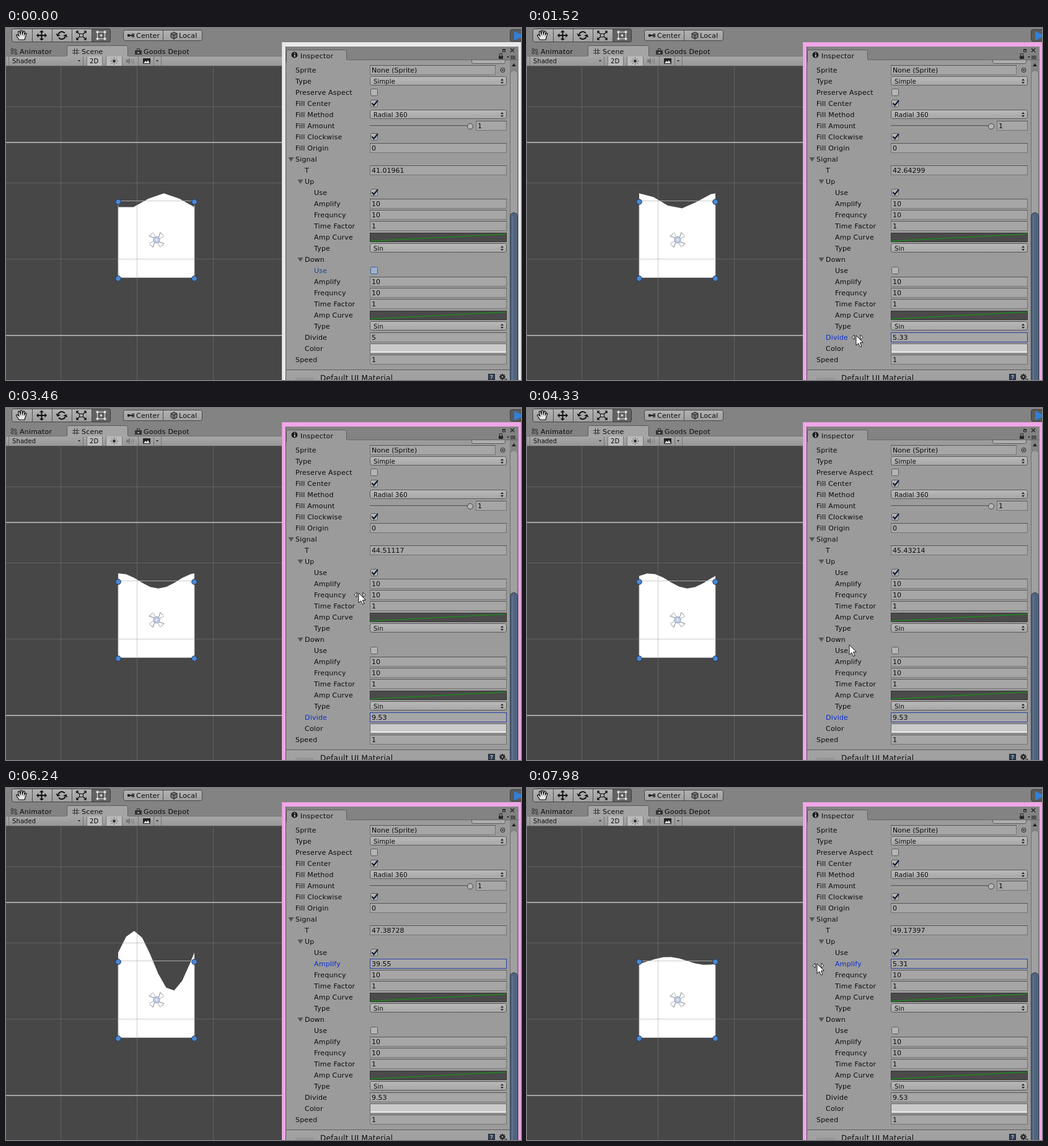
An HTML page with a canvas that plays this animation: 831x569 px, repeating every 8000 ms.

```html
<!DOCTYPE html>
<html lang="en">
<head>
<meta charset="utf-8">
<title>Signal inspector</title>
<style>
html, body { margin: 0; width: 100%; height: 100%; overflow: hidden; background: #838383; }
canvas { display: block; width: 831px; height: 569px; }
</style>
</head>
<body>
<canvas id="stage" width="831" height="569"></canvas>
<script>
const ctx = document.getElementById('stage').getContext('2d');
const LOOP = 8000, TAU = Math.PI * 2;
const FONT = '"DejaVu Sans", Verdana, sans-serif';
const PANEL = '#9b9b9b', BAR = '#838383', INK = '#0c0c0c', BLUE = '#0a2fd0';

// Tracks: [time, value, ...]
const marks = [0, 1520, 2190, 3460, 5220, 6240, 7980];
const clockTrack = [[0, 41.01961], [1520, 42.64299], [2190, 43.34213], [3460, 44.51117],
  [5220, 46.40158], [6240, 47.38728], [7980, 49.17397]];
const phaseTrack = [[0, 0.65], [1520, 2.228], [2190, 2.925], [3460, 4.224],
  [5220, 6.0465], [6240, 7.045], [7980, 8.868]];
const divideTrack = [[1330, 5], [1520, 5.33], [2190, 8.6], [2490, 9.53]];
const ampTrack = [[5300, 10], [5880, 28], [6240, 39.55], [6420, 47], [6690, 28], [7490, 16], [7980, 5.31]];
const pointerTrack = [[560, 560, 532], [830, 530, 506], [1300, 521, 497], [1520, 531, 497],
  [2190, 638, 494], [2480, 668, 492], [3120, 667, 485], [3360, 605, 394], [3460, 569, 299],
  [3700, 545, 214], [4150, 522, 380], [4500, 518, 386], [5000, 515, 310], [5220, 516, 280],
  [5300, 519, 280], [5840, 795, 283], [5890, 811, 284], [5960, 850, 286], [6630, 850, 293],
  [6690, 811, 294], [7490, 622, 293], [7980, 468, 284]];
const PRESS_DIVIDE = 1290, PRESS_AMP = 5180;

function at(track, t, col = 1) {
  if (t <= track[0][0]) return track[0][col];
  for (let i = 1; i < track.length; i++) {
    const a = track[i - 1], b = track[i];
    if (t <= b[0]) return a[col] + (b[col] - a[col]) * (t - a[0]) / (b[0] - a[0]);
  }
  return track[track.length - 1][col];
}

function snap(t) {
  for (let i = 1; i < marks.length; i++) {
    if (t < marks[i]) {
      const a = marks[i - 1], step = (marks[i] - a) / Math.round((marks[i] - a) / 45);
      return a + Math.floor((t - a) / step) * step;
    }
  }
  return marks[marks.length - 1];
}

function rect(x, y, w, h, fill) {
  ctx.fillStyle = fill;
  ctx.fillRect(x, y, w, h);
}
function frame(x, y, w, h, color) {
  ctx.strokeStyle = color;
  ctx.lineWidth = 1;
  ctx.strokeRect(x + 0.5, y + 0.5, w - 1, h - 1);
}
function round(x, y, w, h, r, fill, stroke) {
  ctx.beginPath();
  ctx.roundRect(x + 0.5, y + 0.5, w - 1, h - 1, r);
  ctx.fillStyle = fill;
  ctx.fill();
  if (stroke) { ctx.strokeStyle = stroke; ctx.lineWidth = 1; ctx.stroke(); }
}
function poly(points, fill, stroke, open) {
  ctx.beginPath();
  for (let i = 0; i < points.length; i += 2) ctx.lineTo(points[i], points[i + 1]);
  if (!open) ctx.closePath();
  if (fill) { ctx.fillStyle = fill; ctx.fill(); }
  if (stroke) { ctx.strokeStyle = stroke; ctx.stroke(); }
}
function line(x1, y1, x2, y2, color, width = 1) {
  ctx.lineWidth = width;
  poly([x1, y1, x2, y2], null, color, true);
}
function disc(x, y, r, fill, stroke) {
  ctx.beginPath();
  ctx.arc(x, y, r, 0, TAU);
  if (fill) { ctx.fillStyle = fill; ctx.fill(); }
  if (stroke) { ctx.strokeStyle = stroke; ctx.lineWidth = 1; ctx.stroke(); }
}
function text(s, x, y, color = INK, size = 11, gap = 0.2) {
  ctx.font = size + 'px ' + FONT;
  ctx.letterSpacing = gap + 'px';
  ctx.fillStyle = color;
  ctx.fillText(s, x, y);
}
function shade(y1, c1, y2, c2) {
  const g = ctx.createLinearGradient(0, y1, 0, y2);
  g.addColorStop(0, c1);
  g.addColorStop(1, c2);
  return g;
}
function arrowHead(x, y, angle, size, color) {
  ctx.save();
  ctx.translate(x, y);
  ctx.rotate(angle);
  poly([size, 0, 0, -size, 0, size], color);
  ctx.restore();
}

function toolbar() {
  rect(0, 0, 831, 62, BAR);
  round(9, 1, 160, 22, 3, shade(1, '#b4b4b4', 23, '#9d9d9d'), '#454545');
  round(138, 1, 31, 22, 3, '#626262', '#3c3c3c');
  for (const x of [42.5, 74.5, 106.5, 138.5]) line(x, 2, x, 22, '#4e4e4e');

  // Hand
  ctx.lineWidth = 1.2;
  poly([21, 19, 16.5, 12, 18, 10.5, 21, 13, 19.5, 6, 21.5, 5, 23.5, 10, 23.5, 4, 25.7, 4, 26.5, 10,
    28, 5, 30, 5.5, 29.5, 11, 31.5, 8, 33, 9, 30, 19], '#e6e6e6', '#111');
  // Move
  line(51, 12, 64, 12, '#111', 2);
  line(57.5, 6, 57.5, 18, '#111', 2);
  for (let i = 0; i < 4; i++) {
    const a = i * TAU / 4;
    arrowHead(57.5 + Math.cos(a) * 5, 12 + Math.sin(a) * 5, a, 3.6, '#111');
  }
  // Rotate
  ctx.strokeStyle = '#111';
  ctx.lineWidth = 2;
  for (const a of [0, Math.PI]) {
    ctx.beginPath();
    ctx.arc(90, 12, 6, a + 0.35, a + 2.5);
    ctx.stroke();
    arrowHead(90 + Math.cos(a + 0.3) * 6, 12 + Math.sin(a + 0.3) * 6, a - 1.2, 4, '#111');
  }
  // Scale
  frame(118, 9, 7, 6, '#111');
  for (let i = 0; i < 4; i++) {
    const a = TAU / 8 + i * TAU / 4, c = Math.cos(a), s = Math.sin(a);
    line(121.5 + c * 5, 12 + s * 4, 121.5 + c * 10, 12 + s * 8, '#111', 1.5);
    arrowHead(121.5 + c * 8.5, 12 + s * 7.5, a, 3.2, '#111');
  }
  // Rect
  frame(147, 6, 13, 12, '#e4e4e4');
  for (const x of [147.5, 159.5]) for (const y of [6.5, 17.5]) disc(x, y, 2, '#e8e8e8');
  disc(153.5, 12, 1.7, '#e8e8e8');

  round(189, 3, 128, 18, 3, shade(3, '#b3b3b3', 21, '#9f9f9f'), '#454545');
  line(253.5, 4, 253.5, 20, '#505050');
  rect(200, 11, 6, 2, '#222');
  rect(196, 10, 4, 4, '#222');
  frame(203, 9, 4, 6, '#222');
  text('Center', 210, 16);
  ctx.lineWidth = 1;
  poly([266, 9, 271, 6.5, 276, 9, 276, 15, 271, 18, 266, 15], '#777', '#222');
  poly([266, 9, 271, 11.5, 276, 9], null, '#222', true);
  line(271, 11.5, 271, 18, '#222');
  text('Local', 279, 16);

  round(813, 2, 30, 20, 3, '#5a5a5a', '#3a3a3a');
  poly([820, 5, 836, 12.5, 820, 20], '#3180d8');
}

function sceneHeader() {
  for (const [x, y] of [[10, 35], [15, 36], [10, 40], [16, 41]]) disc(x, y, 1.8, null, '#2d2d2d');
  text('Animator', 22, 42);
  round(98, 28, 99, 22, 3, '#a4a4a4', '#5c5c5c');
  for (const d of [0, 4]) {
    line(110.5 + d, 33, 110.5 + d, 43, '#333');
    line(107, 36.5 + d, 118, 36.5 + d, '#333');
  }
  text('Scene', 122, 42);
  rect(208, 36, 11, 7, '#333');
  frame(211, 33, 5, 4, '#333');
  rect(212, 39, 3, 2, '#aaa');
  text('Goods Depot', 222, 42);

  rect(0, 45, 445, 17, shade(45, '#a8a8a8', 62, '#969696'));
  line(0, 45.5, 98, 45.5, '#6f6f6f');
  line(197, 45.5, 445, 45.5, '#6f6f6f');
  line(0, 61.5, 445, 61.5, '#5a5a5a');
  rect(130, 46, 25, 15, '#bcbcbc');
  rect(161, 46, 26, 15, '#bcbcbc');
  for (const x of [4, 124, 130, 155, 161, 187, 213, 238, 250]) line(x + 0.5, 46, x + 0.5, 61, '#757575');
  text('Shaded', 10, 57, INK, 10, 0.1);
  poly([116, 52, 120, 52, 118, 54.5], '#222');
  text('2D', 135, 57, INK, 10, 0.1);
  disc(174.5, 53.5, 2.4, '#333');
  for (let i = 0; i < 8; i++) {
    const c = Math.cos(i * TAU / 8), s = Math.sin(i * TAU / 8);
    line(174.5 + c * 4, 53.5 + s * 4, 174.5 + c * 5.8, 53.5 + s * 5.8, '#333');
  }
  poly([194, 51, 197, 51, 200, 48, 200, 59, 197, 56, 194, 56], '#777');
  ctx.lineWidth = 1;
  ctx.strokeStyle = '#777';
  for (const r of [3, 6]) { ctx.beginPath(); ctx.arc(200, 53.5, r, -0.9, 0.9); ctx.stroke(); }
  rect(221, 49, 12, 9, '#222');
  poly([222, 57, 225, 53, 227, 55, 229, 52, 232, 57], '#ddd');
  poly([242, 52, 246, 52, 244, 54.5], '#222');
}

function scene(phase, divide, amp) {
  rect(0, 62, 445, 507, '#474747');
  const left = 181, width = 123, top = 279.5, unit = 1.23;
  const pts = [left, 403.5];
  const add = u => pts.push(left + u * width, top - amp * unit * Math.sin(TAU * (phase + u)));
  for (let i = 0; i < divide; i++) add(i / divide);
  add(1);
  pts.push(left + width, 403.5);
  poly(pts, '#fff');

  const grid = 'rgba(136,136,136,.42)';
  for (const x of [88.5, 211.5, 334.5]) line(x, 62, x, 569, grid);
  for (const y of [127.5, 250.5, 373.5]) line(0, y, 445, y, grid);
  for (const y of [185, 497]) line(0, y, 445, y, '#c4c4c4', 1.6);
  ctx.lineWidth = 1;
  ctx.strokeStyle = 'rgba(190,190,190,.8)';
  ctx.strokeRect(181, 279.5, 123, 124);

  // Pivot gizmo
  ctx.save();
  ctx.translate(243, 342.5);
  ctx.lineWidth = 1;
  for (let i = 0; i < 4; i++) {
    ctx.rotate(TAU / 4);
    poly([3, 3, 12, 6, 7, 11], null, '#7d8288', true);
    line(2, 5, 6, 12, '#a4a9b0');
  }
  disc(0, 0, 5.2, 'rgba(176,193,219,.85)', '#94a3bb');
  disc(0, 0, 2, '#dfe7f2');
  ctx.restore();

  for (const x of [181, 304]) for (const y of [281, 405]) disc(x, y, 4.3, '#4c87d2', '#1c3557');
}

function field(x, y, w, value, focused) {
  rect(x, y - 8, w, 16, '#a6a6a6');
  frame(x, y - 8, w, 16, focused ? '#2c43a8' : '#747474');
  if (!focused) rect(x, y - 8, w, 1, '#565656');
  text(value, x + 3, y + 4, INK, 11, 0);
}
function popup(y, value) {
  round(587, y - 8, 221, 15, 3, shade(y - 8, '#bababa', y + 7, '#a6a6a6'), '#5a5a5a');
  text(value, 593, y + 3.5, INK, 10, 0.15);
  poly([798, y - 1, 803, y - 1, 800.5, y - 4], '#222');
  poly([798, y + 1, 803, y + 1, 800.5, y + 4], '#222');
}
function check(y, on, focused) {
  round(588, y - 6, 12, 12, 2, focused ? '#9fb0cc' : '#b4b4b4', focused ? '#3c5f9c' : '#5c5c5c');
  if (on) {
    ctx.lineWidth = 2.2;
    poly([590.5, y - 0.5, 593.5, y + 3, 600, y - 5], null, '#0d1b33', true);
  }
}
function curve(y) {
  rect(587, y - 7, 221, 15, '#4a4a4a');
  frame(587, y - 7, 221, 15, '#333');
  line(588, y + 6.5, 807, y - 5, '#0ba30b');
}
function fold(x, y) {
  poly([x - 4.5, y - 3, x + 4.5, y - 3, x, y + 4], '#555');
}

function inspector(s) {
  rect(445, 23, 386, 546, s.active ? '#f0a6e8' : '#e9e9e9');
  line(445.5, 24, 445.5, 569, s.active ? '#d79bd0' : '#cfcfcf');
  rect(452, 30, 375, 539, BAR);
  rect(451, 30, 1, 539, '#555');
  rect(452, 52, 361, 517, PANEL);
  line(550, 51.5, 827, 51.5, '#666');
  round(452, 35, 98, 22, 3, PANEL, '#5f5f5f');
  rect(453, 51, 97, 8, PANEL);
  disc(465.5, 43.5, 5, '#1d1d1d');
  rect(465, 43, 1.5, 4, '#ddd');
  rect(465, 40, 1.5, 1.5, '#ddd');
  text('Inspector', 475, 49);
  frame(801, 35, 5, 4, '#222');
  rect(801, 34, 5, 2, '#222');
  line(814, 33, 820, 39, '#222', 1.2);
  line(820, 33, 814, 39, '#222', 1.2);
  rect(795, 45, 7, 5, '#222');
  frame(796, 41, 5, 6, '#333');
  poly([808, 46, 812, 46, 810, 48.5], '#222');
  for (const y of [45, 47, 49]) rect(814, y, 8, 1, '#222');
  ctx.save();
  ctx.beginPath();
  ctx.rect(740, 52, 80, 10);
  ctx.clip();
  round(751, 42, 55, 16, 3, '#adadad', '#5a5a5a');
  ctx.restore();

  // Scrollbar
  rect(813, 52, 14, 517, '#858585');
  poly([816, 62, 823, 62, 819.5, 57], '#222');
  round(813, 68, 13, 520, 6, '#a0a0a0', '#707070');
  round(813, 298, 13, 300, 6, '#51647f', '#2b384a');
  line(817.5, 304, 817.5, 569, '#6c7f9a');

  const names = ['Sprite', 'Type', 'Preserve Aspect', 'Fill Center', 'Fill Method', 'Fill Amount',
    'Fill Clockwise', 'Fill Origin', 'Signal', 'T', 'Up', 'Use', 'Amplify', 'Frequncy', 'Time Factor',
    'Amp Curve', 'Type', 'Down', 'Use', 'Amplify', 'Frequncy', 'Time Factor', 'Amp Curve', 'Type',
    'Divide', 'Color', 'Speed'];
  const rowY = i => 68 + i * 18;
  names.forEach((name, i) => {
    let x = 497;
    if (i < 9 || i === 26) x = 467;
    else if ([9, 10, 17, 24, 25].includes(i)) x = 482;
    const color = i !== s.focus ? INK : s.active ? BLUE : '#1f4a94';
    text(name, x, rowY(i) + 4, color);
  });
  fold(460, 212);
  fold(475, 248);
  fold(475, 374);

  field(587, 68, 203, 'None (Sprite)');
  disc(801.5, 68, 3.5, null, '#222');
  disc(801.5, 68, 1.3, '#222');
  popup(86, 'Simple');
  check(104, false);
  check(122, true);
  popup(140, 'Radial 360');
  rect(587, 157, 162, 3, '#6d6d6d');
  rect(587, 159, 162, 1, '#b0b0b0');
  disc(749, 159, 4.5, '#b5b5b5', '#444');
  field(758, 158, 50, '1');
  check(176, true);

  const values = { 7: '0', 9: s.clock.toFixed(5), 12: String(+s.amp.toFixed(2)), 13: '10', 14: '1',
    19: '10', 20: '10', 21: '1', 24: String(+s.divide.toFixed(2)), 26: '1' };
  for (const i in values) field(587, rowY(+i), 221, values[i], +i === s.focus);
  check(266, true);
  check(392, false, s.focus === 18);
  for (const y of [338, 464]) curve(y);
  for (const y of [356, 482]) popup(y, 'Sin');
  rect(587, 510, 221, 16, '#cacaca');
  frame(587, 510, 221, 16, '#646464');
  rect(588, 523, 219, 2, '#f4f4f4');

  // Material header
  line(452, 552.5, 813, 552.5, '#5c5c5c');
  rect(452, 553, 361, 16, '#a1a1a1');
  rect(467, 565, 30, 4, '#969696');
  text('Default UI Material', 507, 570, INK, 12, 0.25);
  rect(778, 559, 11, 10, '#33455f');
  frame(778, 559, 11, 10, '#222');
  text('?', 781, 568, '#e8e8e8', 9, 0);
  for (let i = 0; i < 8; i++) {
    const c = Math.cos(i * TAU / 8), q = Math.sin(i * TAU / 8);
    line(801 + c * 3, 564 + q * 3, 801 + c * 5, 564 + q * 5, '#222', 2);
  }
  disc(801, 564, 3.3, '#222');
  disc(801, 564, 1.4, '#a1a1a1');
  poly([805, 567, 809, 567, 807, 569], '#222');
}

function pointer(t) {
  if (t < pointerTrack[0][0]) return;
  const x = at(pointerTrack, t, 1), y = at(pointerTrack, t, 2);
  if (x > 831) return;
  const numeric = [230, 284, 302, 320, 410, 428, 446, 500, 536].some(c => Math.abs(y + 3 - c) <= 9);
  ctx.lineWidth = 1;
  if (x < 585 && numeric) {
    for (const d of [-1, 1]) {
      const cx = x + 2, cy = y + 3;
      poly([cx + d * 9, cy, cx + d * 5, cy - 4, cx + d * 5, cy + 4], '#eee', '#222');
    }
  }
  poly([x, y, x, y + 16, x + 3.7, y + 12.6, x + 6.5, y + 18.5, x + 9, y + 17.4, x + 6.4, y + 11.7,
    x + 11.3, y + 11.3], '#fff', '#151515');
}

function draw(now) {
  const t = snap(now % LOOP);
  const s = {
    clock: at(clockTrack, t),
    amp: at(ampTrack, t),
    divide: at(divideTrack, t),
    active: t >= PRESS_DIVIDE,
    focus: t < PRESS_DIVIDE ? 18 : t < PRESS_AMP ? 24 : 12
  };
  toolbar();
  sceneHeader();
  scene(at(phaseTrack, t), s.divide, s.amp);
  inspector(s);
  pointer(t);
}

const start = performance.now();
function tick() {
  draw(performance.now() - start);
  requestAnimationFrame(tick);
}
tick();
</script>
</body>
</html>
```
